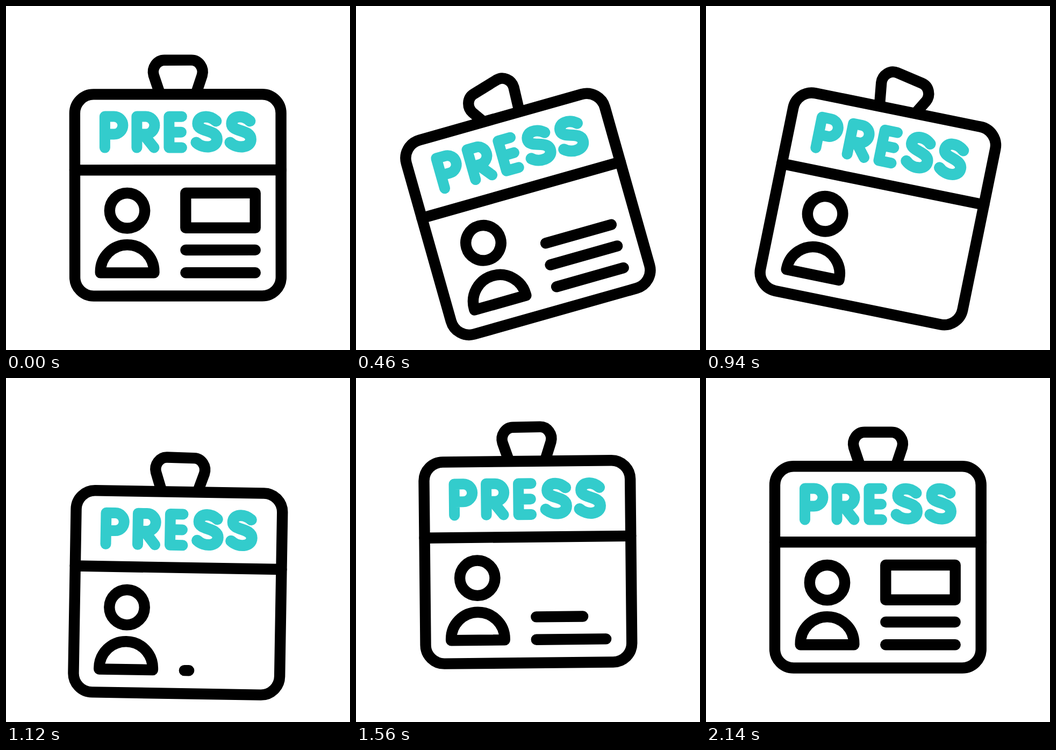
These frames come from a looping animation (640 px wide and 640 px high, 2.4 s). An HTML page:

```html
<!DOCTYPE html>
<html lang="en">
<head>
<meta charset="utf-8">
<title>Press badge</title>
<style>
  html, body { margin: 0; width: 100%; height: 100%; overflow: hidden; background: #fff; }
  svg { display: block; width: 100%; height: 100%; }
  .ink, .word { fill: none; stroke-linecap: round; stroke-linejoin: round; }
  .ink { stroke: #000; stroke-width: 20.4; }
  .word { stroke: #3cc; stroke-width: 20; }
  #s { stroke-width: 21; }
</style>
</head>
<body>
<svg viewBox="0 0 640 640" role="img" aria-label="PRESS">
  <g id="badge" class="ink">
    <path id="clip" d="M287 165 L275 129 C271 115 281 100.7 295 100.7 H345 C359 100.7 369 115 365 129 L353 165"/>
    <rect x="128" y="164.3" width="383.7" height="375.2" rx="35" fill="#fff"/>
    <path d="M128 305.2 H511.7"/>
    <g class="word">
      <path d="M184 263.5 V205.5 H201 a16.5 16.5 0 0 1 0 33 H184"/>
      <path d="M243.5 263.5 V205.5 H260 a16.5 16.5 0 0 1 0 33 H243.5 M256 239 L275.5 263.5"/>
      <path d="M327 205.7 H303.5 V263.5 H327 M303.5 234.7 H326"/>
      <path id="s" d="M391 214 C377 202 357 204 357 219 C357 235 392.5 229 392.5 248 C392.5 265 367 266 354 254"/>
      <use href="#s" x="63"/>
    </g>
    <circle cx="225.5" cy="380.7" r="32.7"/>
    <path d="M175.7 496.3 V494 a49.8 49.8 0 0 1 99.6 0 V496.3 Z"/>
    <path class="detail" d="M463.7 412.8 H334.3 V348 H463.7 Z"/>
    <path class="detail" d="M334.3 454 H463.7"/>
    <path class="detail" d="M334.3 496.3 H463.7"/>
  </g>
</svg>
<script>
  const LOOP = 2400;
  const ACTIVE = 2140;
  const badge = document.getElementById('badge');
  const clip = document.getElementById('clip');
  const details = [...document.querySelectorAll('.detail')];

  const clamp = p => Math.min(1, Math.max(0, p));
  const linear = p => p;
  const smooth = p => p * p * (3 - 2 * p);

  // Passes through evenly spaced peaks, starting and ending at rest.
  function sway(peaks, ease, t) {
    const poses = [0, ...peaks, 0];
    const place = clamp(t / ACTIVE) * (poses.length - 1);
    const i = Math.min(Math.floor(place), poses.length - 2);
    return poses[i] + (poses[i + 1] - poses[i]) * ease(place - i);
  }

  // Details vanish from top to bottom and return from bottom to top.
  function shownPart(i, t) {
    const erased = clamp((t - 275 - 186 * i) / 276);
    const drawn = clamp((t - 1100 - 241 * (details.length - 1 - i)) / 328);
    return 1 - erased + drawn;
  }

  function trim(path, part) {
    const length = path.getTotalLength();
    path.style.visibility = part < 0.002 ? 'hidden' : 'visible';
    path.style.strokeDasharray = part > 0.999 ? 'none' : `${length * part} ${length * 2}`;
  }

  function draw(t) {
    const angle = sway([-18.5, 16.5, -8.6, 3.8], linear, t);
    const lift = sway([54, -36, 51.6, -21, 15.3], smooth, t);
    badge.setAttribute('transform', `translate(0 ${lift}) rotate(${angle} 320 351.7)`);
    clip.setAttribute('transform', `rotate(${angle} 320 146)`);
    details.forEach((path, i) => trim(path, shownPart(i, t)));
  }

  const start = performance.now();
  function tick() {
    draw((performance.now() - start) % LOOP);
    requestAnimationFrame(tick);
  }
  draw(0);
  requestAnimationFrame(tick);
</script>
</body>
</html>
```
